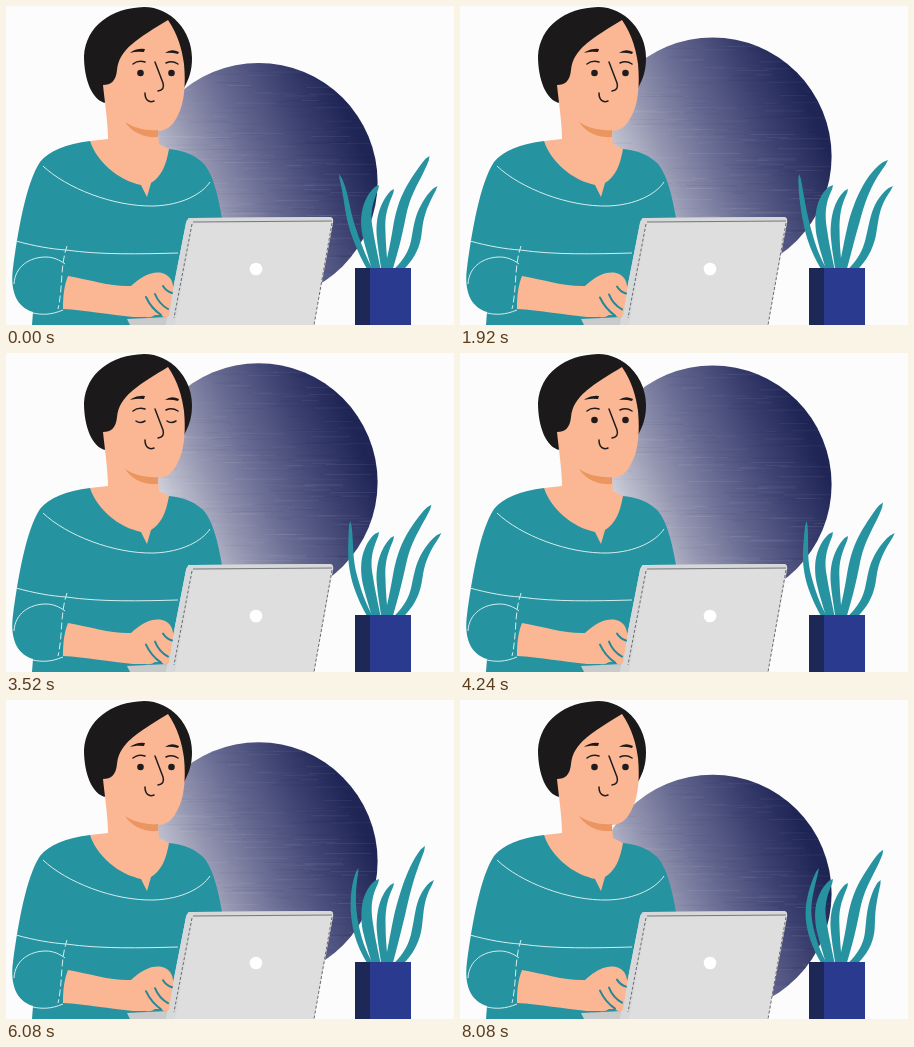
Write an HTML page that moves like this. It is 448 by 319 pixels and loops after 8.16 s.

```html
<!DOCTYPE html>
<html lang="en">
<head>
<meta charset="utf-8">
<title>Working at a laptop</title>
<style>
html, body { margin: 0; width: 100%; height: 100%; overflow: hidden; background: #fcfcfc }
svg { display: block; width: 100%; height: 100% }
.line { fill: none; stroke: #201c1e; stroke-width: 1.5; stroke-linecap: round }
.seam { fill: none; stroke: #d5edef; stroke-width: 1 }
.gap { fill: none; stroke: #24889a; stroke-width: 2; stroke-linecap: round }
</style>
</head>
<body>
<svg viewBox="0 0 448 319">
  <defs>
    <linearGradient id="metal" gradientUnits="userSpaceOnUse" x1="-95" y1="45" x2="100" y2="-42">
      <stop offset="0" stop-color="#dedee6"/>
      <stop offset=".12" stop-color="#bcbdcc"/>
      <stop offset=".3" stop-color="#9193af"/>
      <stop offset=".52" stop-color="#666991"/>
      <stop offset=".78" stop-color="#3c4170"/>
      <stop offset="1" stop-color="#1f2555"/>
    </linearGradient>
    <clipPath id="round"><circle r="119"/></clipPath>
  </defs>

  <g id="disc">
    <circle r="119" fill="url(#metal)"/>
    <g id="streaks" clip-path="url(#round)"></g>
  </g>

  <g id="plant" fill="#2893a0"></g>
  <path d="M349 262H405V319H349z" fill="#2a3b8f"/>
  <path d="M349 262H364V319H349z" fill="#1e2857"/>

  <!-- sweater -->
  <path d="M84 135C60 138 43 145 34 156C20 177 12 225 7 262C4 284 10 301 27 306L26 319H165L182 212H216C212 188 206 165 196 156C186 147 174 144 163 143z" fill="#2693a0"/>
  <g class="seam">
    <path d="M37 160C60 182 108 201 148 200C176 199 196 188 204 176"/>
    <path d="M10 235C28 240 45 243 60 244C95 249 135 248 172 247"/>
    <path d="M8 278C9 260 24 251 40 251C47 251 54 254 59 258"/>
    <path d="M61 240C54 260 57 282 52 303" stroke-dasharray="7 3"/>
    <path d="M27 307C36 309 45 309 57 304"/>
  </g>

  <!-- head -->
  <path d="M100 97C86 95 78 73 78 50C80 20 105 2 138 1C165 1 186 25 186 52C186 65 183 73 178 82L140 60z" fill="#1c191a"/>
  <path d="M97 79C105 79 110 75 111 64C112 53 118 45 125 39C135 30 149 22 162 14C172 29 176 43 178 58C180 79 178 98 172 109C167 120 160 125 152 125L153 138L163 143C160 160 155 171 145 177L141 191L135 179C112 174 91 156 84 135L102 133C102 118 99 98 97 79z" fill="#fbb793"/>
  <path d="M119 116C128 122 140 125 152 124V131C139 132 126 127 119 116z" fill="#eb9660"/>
  <path d="M124 47Q130 42 139 43L138 46Q130 45 124 47zM159 47Q165 42 173 46L172 48Q165 46 159 47z" fill="#1c191a"/>
  <path class="line" d="M149 56L157 77Q159 84 152 85M139 87C139 94 143 97 148 95"/>
  <path class="line" d="M127 58Q132 54 139 56M160 57Q166 54 172 58"/>
  <g id="open" fill="#201c1e"><circle cx="134.5" cy="67" r="3.3"/><circle cx="165.5" cy="67" r="3.3"/></g>
  <path id="shut" class="line" d="M130 68Q134 71 139 68M161 68Q165 71 170 68"/>

  <!-- laptop, then the arm in front of its base -->
  <path d="M121 313L162 311V319H124z" fill="#c9cacc"/>
  <path d="M180 217Q181 212 187 212L323 211Q328 211 327 217L308 319H160z" fill="#dedede"/>
  <path d="M180 217Q181 212 187 212L323 211Q328 211 327 216L187 217L169 319H160z" fill="#d7d8d9"/>
  <path d="M187 216L326 215" stroke="#77787a" fill="none"/>
  <path d="M186 218L168 312M326 217L308 319" fill="none" stroke="#6c6c6e" stroke-dasharray="3 2"/>
  <circle cx="250" cy="263" r="6.3" fill="#fff"/>
  <path d="M62 270C85 274 106 281 125 280C136 270 146 265 156 267C164 269 168 276 167 284L163 310Q159 313 155 309L149 309Q145 312 140 311L127 311C104 309 80 304 57 303C57 290 58 280 62 270z" fill="#fbb793"/>
  <g id="gaps" class="gap">
    <path d="M140 291Q145 302 155 309M149 288Q153 298 162 303M157 280Q160 285 166 287"/>
  </g>
</svg>
<script>
const LOOP = 8160, STEP = 80, TURN = 3840, TAU = 2 * Math.PI;
const $ = id => document.getElementById(id);
const mix = (a, b, k) => a + (b - a) * k;

// base and two controls as points, half width, strength of the ripple, tip at loop phase p
const leaves = [
  { curve: [[366, 266], [348, 240], [342, 200]], half: 3.8, ripple: 1,
    tip: p => [333 + 26 * p, 168] },
  { curve: [[371, 266], [362, 230], [352, 202]], half: 6.8, ripple: .5,
    tip: () => [373, 179] },
  { curve: [[390, 266], [424, 235], [402, 208]], half: 5.6, ripple: 1.2,
    tip: p => [436 - 11 * p - 4.5 * Math.cos(TAU * p), 180] },
  { curve: [[382, 266], [393, 222], [398, 180]], half: 6.4, ripple: 1.8,
    tip: p => [423.5 + 4.5 * Math.sin(TAU * p), 150 + 4 * Math.sin(TAU * p)] },
  { curve: [[379, 266], [374, 228], [371, 204]], half: 5.4, ripple: .5,
    tip: () => [388, 183] }
];

function add(parent, name, attrs = {}) {
  const el = document.createElementNS('http://www.w3.org/2000/svg', name);
  for (const a in attrs) el.setAttribute(a, attrs[a]);
  return parent.appendChild(el);
}

for (const leaf of leaves) leaf.el = add($('plant'), 'path');

let seed = 7;
const rnd = () => (seed = seed * 16807 % 2147483647) / 2147483647;
for (let i = 0; i < 300; i++) {
  add($('streaks'), 'path', {
    d: `M${mix(-130, 110, rnd())} ${mix(-118, 118, rnd())}h${mix(12, 55, rnd())}`,
    'stroke-width': .7, stroke: i % 2 ? '#fff' : '#151b48', opacity: mix(.03, .11, rnd())
  });
}

function bezier([a, b, c, d], k) {
  const m = 1 - k;
  return [0, 1].map(i =>
    m ** 3 * a[i] + 3 * m * m * k * b[i] + 3 * m * k * k * c[i] + k ** 3 * d[i]);
}

// thickens the centre line into a leaf with a rounded tip
function leafPath({ curve, half, ripple, tip }, p) {
  const ends = [...curve, tip(p)];
  const wave = ripple * (.5 + .5 * Math.cos(2 * TAU * p));
  const point = k => {
    const [x, y] = bezier(ends, k);
    return [x + wave * k * Math.sin(k * 1.5 * TAU), y];
  };
  const left = [], right = [];
  for (let i = 0; i <= 24; i++) {
    const k = i / 24, [x, y] = point(k), [x0, y0] = point(k - .01), [x1, y1] = point(k + .01);
    const w = half * mix(1, .6, k) * Math.min(1, .6 + k) * Math.sqrt(1 - k ** 6) / Math.hypot(x1 - x0, y1 - y0);
    const nx = (y1 - y0) * w, ny = (x0 - x1) * w;
    left.push(`${x + nx} ${y + ny}`);
    right.unshift(`${x - nx} ${y - ny}`);
  }
  return `M${[...left, ...right].join('L')}z`;
}

function draw() {
  const t = Math.floor(performance.now() % LOOP / STEP) * STEP;
  const y = t < TURN ? mix(176, 125, t / TURN) : mix(125, 195, (t - TURN) / (LOOP - TURN));
  $('disc').setAttribute('transform', `translate(252.6 ${y})`);
  for (const leaf of leaves) leaf.el.setAttribute('d', leafPath(leaf, t / LOOP));
  const blink = Math.abs(t % 2320 - 1240) < 100;
  $('open').style.display = blink ? 'none' : '';
  $('shut').style.display = blink ? '' : 'none';
  $('gaps').setAttribute('transform', `translate(0 ${.6 * Math.sin(t / 130)})`);
  requestAnimationFrame(draw);
}
draw();
</script>
</body>
</html>
```
